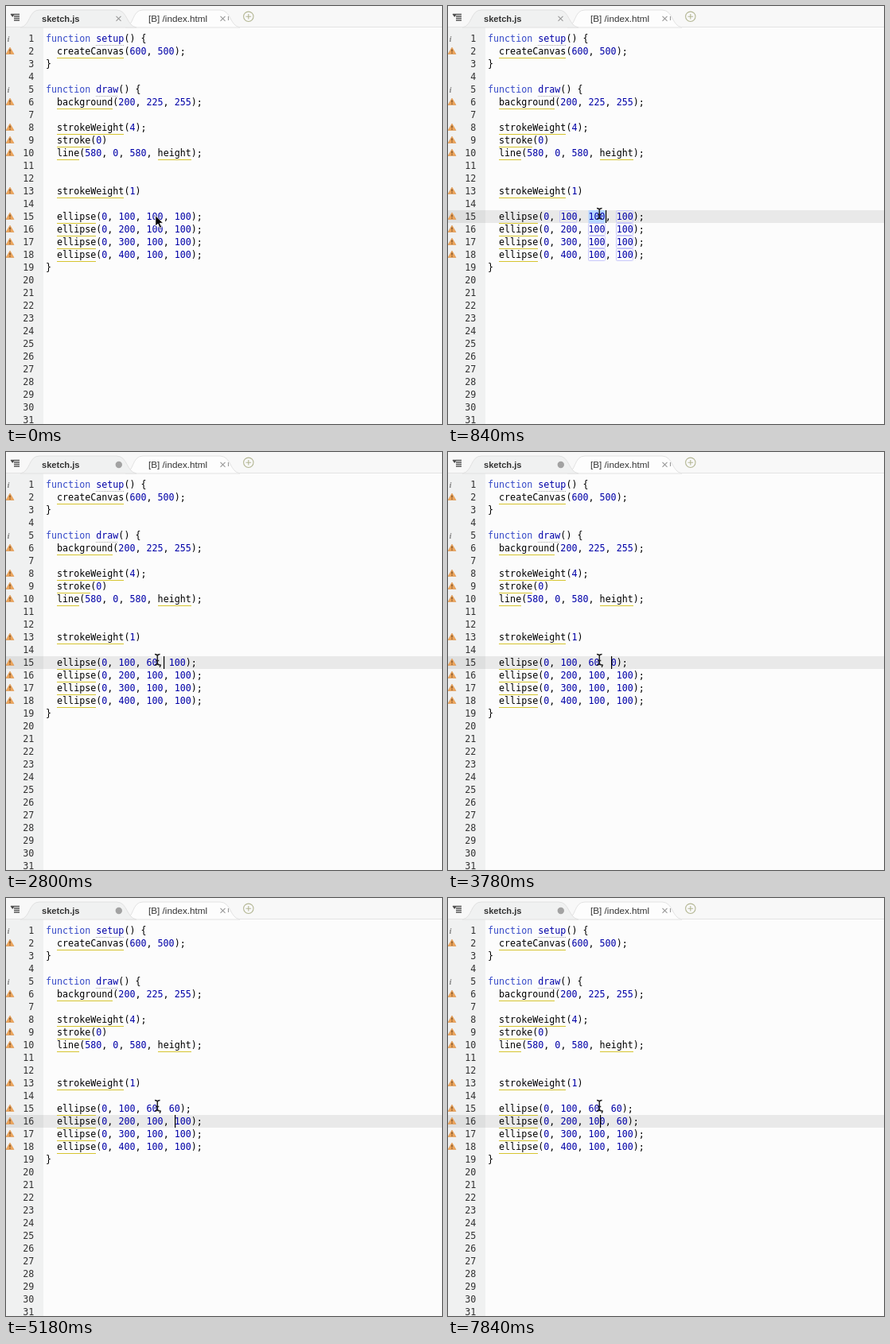
An HTML page that plays this animation: 548 by 526 pixels, repeating every 8 s.

```html
<!DOCTYPE html>
<html lang="en">
<head>
<meta charset="utf-8">
<title>Code editor</title>
<style>
html, body { margin: 0; width: 100%; height: 100%; overflow: hidden; background: #fcfcfc; }
svg { display: block; width: 548px; height: 526px; }
.code text { font: 11.68px "DejaVu Sans Mono", monospace; white-space: pre; }
.keyword { fill: #3448c8; }
.name, .number { fill: #0000a8; }
.lines text { text-anchor: end; fill: #333; }
.tab { font: 11.7px "Liberation Sans", Arial, sans-serif; fill: #333; }
.tab.active { font-size: 11.1px; font-weight: bold; }
.warn { stroke: #d6c530; }
.hint { stroke: #aaa; stroke-dasharray: 1 1; }
.match { fill: none; stroke: #c8c8fa; }
</style>
</head>
<body>
<svg viewBox="0 0 548 526">
  <rect width="548" height="526" fill="#fcfcfc"/>
  <rect y="27" width="47" height="499" fill="#f0f1f1"/>
  <rect width="548" height="27" fill="#f8f8f8"/>
  <path d="M0 26.5H548" stroke="#e4e4e4"/>
  <path d="M150 27C161 25 158 5 172 5H269C283 5 281 25 294 27Z" fill="#fdfdfd" stroke="#e3e3e3"/>
  <path d="M18 27C31 25 28 5 42 5H139C153 5 151 25 164 27Z" fill="#f0f1f1" stroke="#e1e1e1"/>
  <path d="M5.5 10H11L8.2 14Z" fill="#444"/>
  <path d="M6 10.5H17M10 13H17M10 15.5H17M10 18H17" stroke="#555" stroke-width="1.3"/>
  <text class="tab active" x="45" y="20">sketch.js</text>
  <text class="tab" x="179" y="20">[B] /index.html</text>
  <g fill="none" stroke="#999" stroke-width="1.1">
    <path id="close" d="M138.5 12.8l6 6m0-6l-6 6"/>
    <path d="M269.5 12.8l6 6m0-6l-6 6M279.5 13v5"/>
    <g stroke="#b4b794"><circle cx="304.8" cy="13.3" r="6.2"/><path d="M301.5 13.3h6.6m-3.3-3.3v6.6"/></g>
  </g>
  <circle id="unsaved" cx="141.8" cy="16" r="4.2" fill="#a2a2a2"/>
  <rect id="activeLine" width="548" height="16" fill="#000" opacity=".075"/>
  <rect id="selection" x="176.5" y="257" width="21.2" height="16" fill="#b5d5ff"/>
  <g id="matches"></g>
  <g id="gutter" class="code lines"></g>
  <g id="marks"></g>
  <g id="code" class="code"></g>
  <rect id="caret" width="1.2" height="16" fill="#000"/>
  <path id="arrow" d="M187.8 263.5V277L191 274.2L193.3 279.4L195.7 278.3L193.4 273.3H197.6Z" stroke="#fff" stroke-width=".9"/>
  <path id="beam" d="M187 254.5Q190.3 254.5 190.3 257V265.5Q190.3 268 187 268M193.6 254.5Q190.3 254.5 190.3 257M190.3 265.5Q190.3 268 193.6 268M188.3 262.5H192.3" fill="none" stroke="#222" stroke-width="1.5"/>
</svg>
<script>
const ADVANCE = 7.03, LEFT = 50, ROW = 16, LOOP = 8000;
const $ = id => document.getElementById(id);
const rowY = line => 33 + (line - 1) * ROW;
const colX = col => LEFT + col * ADVANCE;
const show = (id, on) => $(id).setAttribute('visibility', on ? 'visible' : 'hidden');

const source = [
  'function setup() {', '  createCanvas(600, 500);', '}', '',
  'function draw() {', '  background(200, 225, 255);', '',
  '  strokeWeight(4);', '  stroke(0)', '  line(580, 0, 580, height);', '', '',
  '  strokeWeight(1)', '',
  ...[100, 200, 300, 400].map(y => `  ellipse(0, ${y}, 100, 100);`), '}'
];

const paint = text => text
  .replace(/\b\d+\b/g, '<tspan class="number">$&</tspan>')
  .replace(/^function (\w+)/, '<tspan class="keyword">function</tspan> <tspan class="name">$1</tspan>');

function underline(line, col, length, kind) {
  const y = rowY(line) + 16.5;
  return `<path class="${kind}" d="M${Math.round(colX(col))} ${y}H${Math.round(colX(col + length))}"/>`;
}

let numbers = '', marks = '';
for (let line = 1; line <= 31; line++) {
  const y = rowY(line), text = source[line - 1] || '';
  numbers += `<text x="35.3" y="${y + 12}">${line}</text>`;
  const call = text.match(/^  (\w+)\(/), definition = text.match(/^function (\w+)/);
  if (call) {
    marks += underline(line, 2, call[1].length, 'warn') +
      `<path d="M5 ${y + 3}L10 ${y + 11.5}H0Z" fill="#eda45a" stroke="#dc9550" stroke-width=".6"/>` +
      `<path d="M5 ${y + 5.5}v3m0 1v1.2" stroke="#68401c" stroke-width="1.2"/>`;
  }
  if (definition) {
    marks += underline(line, 9, definition[1].length, 'hint') +
      `<text x="1.5" y="${y + 12}" fill="#888" font-family="Liberation Serif, serif" font-size="11" font-style="italic" font-weight="bold">i</text>`;
  }
}
marks += underline(10, 20, 6, 'warn');
$('gutter').innerHTML = numbers;
$('marks').innerHTML = marks;
$('code').innerHTML = source.map((text, i) =>
  `<text x="${LEFT}" y="${rowY(i + 1) + 12}">${paint(text)}</text>`).join('');

const box = (line, col) =>
  `<rect class="match" x="${Math.round(colX(col)) - .5}" y="${rowY(line) + .5}" width="21" height="15" rx="1"/>`;
$('matches').innerHTML = box(15, 13) +
  [15, 16, 17, 18].map(line => (line > 15 ? box(line, 18) : '') + box(line, 23)).join('');

// Each step changes only the listed fields.
const start = { line: 0, col: 0, a: '100, 100', b: '100, 100', caret: false, selected: false, dirty: false, beam: false };
const steps = [
  [280, { line: 15, col: 20, caret: true }],
  [420, { beam: true }],
  [560, { col: 21, selected: true }],
  [1400, { a: '6, 100', col: 19, selected: false, dirty: true }],
  [1540, { a: '60, 100', col: 20 }],
  [1960, { caret: false }],
  [2380, { caret: true }],
  [2800, { col: 21 }],
  [2940, { col: 22 }],
  [3220, { col: 23 }],
  [3360, { col: 24 }],
  [3780, { a: '60, 0', col: 22 }],
  [4480, { caret: false }],
  [4760, { a: '60, 60', col: 23, caret: true }],
  [5180, { line: 16 }],
  [5460, { caret: false }],
  [6020, { col: 24, caret: true }],
  [6160, { col: 25 }],
  [6440, { b: '100, 10', col: 24 }],
  [6580, { b: '100, 0', col: 23 }],
  [6720, { b: '100, 60', col: 24 }],
  [7140, { col: 23 }],
  [7420, { col: 22 }],
  [7560, { col: 21 }],
  [7840, { col: 20 }]
];

function render(s) {
  const rows = $('code').children;
  rows[14].innerHTML = paint(`  ellipse(0, 100, ${s.a});`);
  rows[15].innerHTML = paint(`  ellipse(0, 200, ${s.b});`);
  $('activeLine').setAttribute('y', rowY(s.line));
  $('caret').setAttribute('x', Math.round(colX(s.col)));
  $('caret').setAttribute('y', rowY(s.line));
  show('activeLine', s.line);
  show('caret', s.caret);
  show('selection', s.selected);
  show('matches', s.selected);
  show('unsaved', s.dirty);
  show('close', !s.dirty);
  show('beam', s.beam);
  show('arrow', !s.beam);
}

let shown = -1;
function tick() {
  const time = performance.now() % LOOP;
  const past = steps.filter(([at]) => at <= time);
  if (past.length !== shown) {
    shown = past.length;
    render(Object.assign({}, start, ...past.map(([, change]) => change)));
  }
  requestAnimationFrame(tick);
}
tick();
</script>
</body>
</html>
```
